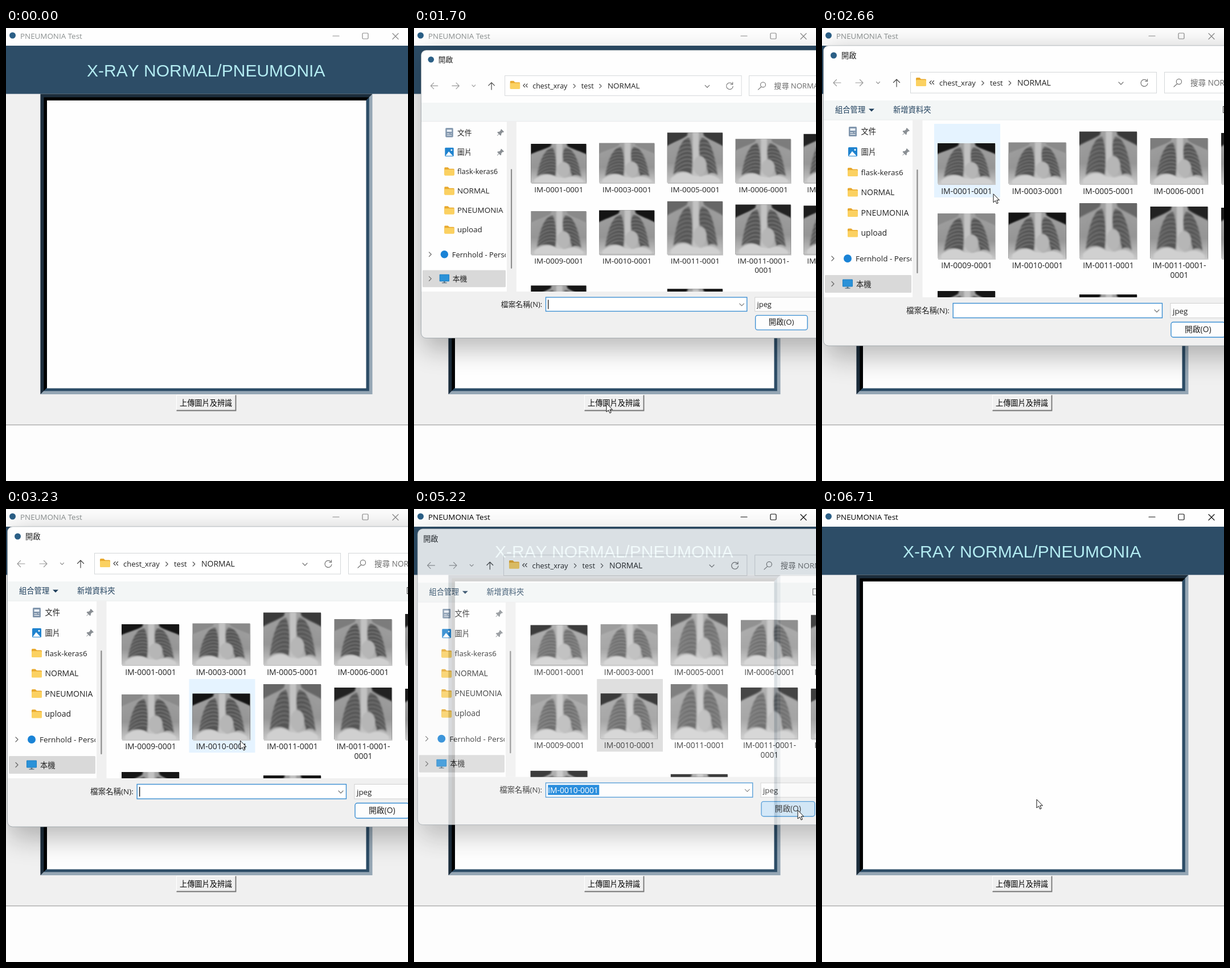
Animation of 706x794 px, one loop 8000 ms. Source, as an HTML page:

```html
<!DOCTYPE html>
<html lang="zh-Hant">
<head>
<meta charset="utf-8">
<title>PNEUMONIA Test</title>
<style>
html,body{margin:0;width:100%;height:100%;overflow:hidden;background:#fdfdfd}
svg{display:block}
text{font-family:'Open Sans','Noto Sans CJK TC','Noto Sans CJK',sans-serif;font-size:14px;fill:#222;white-space:pre}
.line{fill:none;stroke-linecap:round;stroke-linejoin:round}
</style>
</head>
<body>
<svg id="stage" width="706" height="794" viewBox="0 0 706 794"></svg>
<script>
const LOOP = 8000;
const NAV = '#2d4d67';

const rect = (x, y, w, h, fill, more = '') =>
  `<rect x="${x}" y="${y}" width="${w}" height="${h}" fill="${fill}" ${more}/>`;
const text = (x, y, s, more = '') => `<text x="${x}" y="${y}" ${more}>${s}</text>`;
const line = (d, color, w = 1.2, more = '') =>
  `<path class="line" d="${d}" stroke="${color}" stroke-width="${w}" ${more}/>`;
const shape = (d, fill) => `<path d="${d}" fill="${fill}"/>`;
const dot = (x, y, r, fill) => `<circle cx="${x}" cy="${y}" r="${r}" fill="${fill}"/>`;
const chevron = (x, y, color = '#777', r = 4) =>
  line(`M${x - r} ${y - r / 2}l${r} ${r}l${r} ${-r}`, color);
const next = (x, y, color = '#555', r = 3.5) =>
  line(`M${x - r / 2} ${y - r}l${r} ${r}l${-r} ${r}`, color);

// ---------- shared parts ----------
function ribs() {
  let d = '';
  for (let i = 0; i < 8; i++) {
    const y = 15 + i * 8;
    d += `M45 ${y}C37 ${y - 5} 24 ${y - 3} 12 ${y + 14}M57 ${y}C65 ${y - 5} 78 ${y - 3} 90 ${y + 14}`;
  }
  return line(d, '#989898', 2.2, 'opacity=".5"');
}

const defs = `<defs>
  <linearGradient id="skin" x1="0" y1="0" x2="0" y2="1">
    <stop offset="0" stop-color="#a2a2a2"/><stop offset=".6" stop-color="#959595"/><stop offset="1" stop-color="#cdcdcd"/>
  </linearGradient>
  <filter id="soft" x="0" y="0" width="1" height="1"><feGaussianBlur stdDeviation="1.5"/></filter>
  <filter id="shade" x="-20%" y="-20%" width="140%" height="140%"><feGaussianBlur stdDeviation="24"/></filter>
  <clipPath id="files"><rect x="177" y="161" width="640" height="311"/></clipPath>
  <clipPath id="side"><rect x="3" y="161" width="154" height="311"/></clipPath>
  <symbol id="chest" viewBox="0 0 100 100" preserveAspectRatio="none"><g filter="url(#soft)">
    ${shape('M-5 105V30C10 19 27 14 36 6L38 -5H64L66 6C74 14 90 19 105 30V105Z', 'url(#skin)')}
    ${shape('M40 10C28 9 17 32 11 83C22 75 34 76 44 83C47 60 46 28 40 10Z', '#545454')}
    ${shape('M62 10C75 9 85 32 91 85C85 80 79 79 74 83C73 67 63 57 59 45C56 30 57 18 62 10Z', '#545454')}
    ${ribs()}
    ${rect(46, -5, 11, 110, '#c2c2c2')}
    <ellipse cx="59" cy="66" rx="12" ry="19" fill="#b6b6b6"/>
    ${shape('M6 105V92C20 76 36 77 46 86L62 88C74 82 86 84 95 94V105Z', '#d0d0d0')}
  </g></symbol>
  <g id="folder">
    ${shape('M0 2a1.5 1.5 0 0 1 1.5 -1.5h5l2.5 2.5h7.5a1.5 1.5 0 0 1 1.5 1.5v9.500h-18z', '#e8a92e')}
    ${rect(0, 4.5, 18, 11, '#fbd161', 'rx="1.5"')}
  </g>
  <g id="pin">${shape('M1 -6l5 5l-1.500 1l-1 -.3l-2.500 2.500l-.3 3l-1.200 1l-2.700 -2.700l-3 3l-.6 -.6l3 -3l-2.700 -2.700l1 -1.200l3 -.3l2.500 -2.500l-.3 -1z', '#8a8f94')}</g>
</defs>`;

// ---------- main window ----------
function frame() {
  const l = 60.5, t = 115.5, r = 643.5, b = 642, w = 5.7;
  const corner = (i, c) => shape(
    `M${l + i} ${b - i}V${t + i}H${r - i}l${-w} ${w}H${l + i + w}V${b - i - w}z`, c);
  return rect(l, t, r - l, b - t, '#95a6b4') + corner(0, '#1c2d3c')
    + rect(l + w, t + w, r - l - 2 * w, b - t - 2 * w, NAV) + corner(w, '#000')
    + rect(72, 127, 560.5, 504.5, '#fefefe');
}

const windowArt = rect(0, 0, 706, 794, '#fdfdfd') + rect(0, 31, 706, 664, '#f0f0f0')
  + rect(0, 695, 706, 1.3, '#a6a6a6') + rect(0, 0, 706, 31, '#fefefe')
  + dot(11.5, 13, 5.5, '#2b5f86')
  + `<g id="caption">${text(25, 18.7, 'PNEUMONIA Test', 'style="font-size:13.4px;fill:inherit"')}
    ${['M574 14h11', 'M628 9h6.500q1.500 0 1.500 1.500v7q0 1.500 -1.500 1.500h-7q-1.500 0 -1.500 -1.500v-7q0 -1.500 1.500 -1.500', 'M679 9.500l10 10M689 9.500l-10 10']
      .map(d => `<path class="line" d="${d}" stroke-width="1.2"/>`).join('')}</g>`
  + rect(0, 31, 706, 84.5, NAV)
  + text(142, 84.5, 'X-RAY NORMAL/PNEUMONIA',
    `style="font:30px 'Liberation Sans',Arial,sans-serif;font-kerning:none;fill:#b3ecf2"`)
  + frame()
  + rect(299, 643, 105, 28, '#f0f0f0')
  + `<path id="edgeA" d="M299.500 670.500V643.500H403.500" fill="none"/>
     <path id="edgeB" d="M299.500 670.500H403.500V643.500" fill="none" stroke-width="1.8"/>`
  + text(305, 662, '上傳圖片及辨識', 'id="upload" style="font-size:13.2px;fill:#000"');

// ---------- file dialog ----------
const COL = 124.5, ROW = 130;
const tops = [[202, 200.5, 181.5, 193, 184], [325, 323.5, 307, 313, 315]];
const tones = [['#161616', '#8a8a8a', '#3a3a3a', '#7c7c7c', '#222'],
  ['#8a8a8a', '#141414', '#666', '#222', '#1c1c1c']];
const names = [['0001', '0003', '0005', '0006', '0007'], ['0009', '0010', '0011', '0011', '0013']];

function thumb(x, y, h, tone) {
  return rect(x + 1, y + 1, 101, h + 1, '#c9c9c9') + rect(x, y, 101, h, tone)
    + `<use href="#chest" x="${x}" y="${y}" width="101" height="${h}"/>`;
}

function fileList() {
  const mid = 'text-anchor="middle"';
  let s = '';
  tops.forEach((list, r) => list.forEach((y, c) => {
    const x = 203 + c * COL, mx = x + 51, split = r === 1 && c === 3;
    s += thumb(x, y, 273 + r * 131 - y, tones[r][c])
      + text(mx, 290.5 + r * ROW, `IM-${names[r][c]}-0001${split ? '-' : ''}`, mid)
      + (split ? text(mx, 437.5, '0001', mid) : '');
  }));
  return s + thumb(203, 461, 80, '#161616') + thumb(203 + 2 * COL, 467, 80, '#161616');
}

function sidebar() {
  const icon = y => `<use href="#folder" x="45" y="${y - 8}"/>`;
  const item = (y, s, size = 14) => icon(y) + text(68.5, y + 5, s, `style="font-size:${size}px"`);
  const pin = y => `<use href="#pin" x="148" y="${y}"/>`;
  return rect(5, 433, 152, 31, '#d9d9d9', 'rx="1.5"')
    + rect(47, 173, 14, 17, '#8196ad', 'rx="1.5"') + rect(49.5, 176, 9, 4, '#e8eef5')
    + line('M50 183.500h4M50 186.500h8M57 183h1', '#fff', 1)
    + text(68.5, 186, '文件', 'style="font-size:13.3px"') + pin(181)
    + rect(46, 209, 16, 16, '#1f83cf', 'rx="1.5"') + shape('M47 224l6 -8l7.500 8z', '#fff') + dot(58, 213.5, 1.5, '#fff')
    + text(68.5, 222, '圖片', 'style="font-size:13.3px"') + pin(217)
    + item(252.5, 'flask-keras6', 13.4) + item(288, 'NORMAL') + item(323.5, 'PNEUMONIA') + item(359, 'upload')
    + next(19, 404, '#666', 4) + dot(45, 404, 7, '#1a83d6') + text(59, 409, 'Fernhold - Personal', 'style="font-size:13.5px"')
    + next(19, 448.5, '#666', 4) + rect(36, 440.5, 18, 13, '#1c7fc4', 'rx="1"') + rect(37, 441.5, 16, 11, '#2b92d8')
    + rect(43.5, 453.5, 3, 2.5, '#5b7486') + rect(40.5, 455.5, 9, 1.3, '#5b7486')
    + text(60, 453.5, '本機', 'style="font-size:13.3px"');
}

const blue = 'style="font-size:13.3px;fill:#1f3f5c"';
const dialogArt = `<g id="dialog">
  ${rect(6, 40, 830, 537, '#000', 'rx="9" opacity=".27" filter="url(#shade)"')}
  ${rect(2.5, 31, 830, 526, '#f0f0f0', 'rx="9" stroke="#8b959c" stroke-width=".7"')}
  ${shape('M3 127V40a9 9 0 0 1 9 -8.500H800V127z', '#fefefe')}
  ${rect(3, 127, 800, 34, '#f3f6f6')}${rect(3, 160.5, 800, 311.5, '#fefefe')}
  ${rect(3, 160.5, 800, 1, '#e6e9ea')}
  <g id="mark">${dot(20.5, 48, 5.5, '#2b5f86')}</g>
  <text id="heading" y="53" style="font-size:13.3px">開啟</text>
  ${line('M33 96h-13m5.500 -5.500l-5.500 5.500l5.500 5.500M59 96h13m-5.500 -5.500l5.500 5.500l-5.500 5.500', '#999')}
  ${chevron(98.5, 96, '#999', 3)}${line('M131 103v-13m-5.500 5.500l5.500 -5.500l5.500 5.500', '#444')}
  ${rect(155.5, 77.5, 432, 36.5, '#fff', 'stroke="#d4d7d9"')}
  <use href="#folder" x="165" y="86.500"/>
  ${line('M192 92.500l-3 3l3 3M196.500 92.500l-3 3l3 3', '#444')}
  ${text(206, 101, 'chest_xray', 'style="font-size:13px"')}${next(282.5, 96.5)}
  ${text(295, 101, 'test', 'style="font-size:13px"')}${next(330, 96.5)}${text(343, 101, 'NORMAL')}
  ${chevron(525, 97)}
  ${line('M571 93a6 6 0 1 0 1 4M571.500 89.500v4h-4', '#777')}
  ${rect(601.5, 77.5, 240, 36.5, '#fff', 'stroke="#d4d7d9"')}
  ${line('M623.500 98l-5.500 5M631.500 94a4.600 4.600 0 1 1 -9.200 0a4.600 4.600 0 1 1 9.200 0', '#777')}
  ${text(647, 101, '搜尋 NORMAL', 'style="font-size:13.6px;fill:#6a6a6a"')}
  <g id="tools">${text(23, 148, '組合管理', blue)}${shape('M82 141.500h10l-5 5z', '#1f3f5c')}
    ${text(125, 148, '新增資料夾', blue)}${rect(704.5, 137.5, 12, 11, 'none', 'stroke="#444"')}</g>
  <g clip-path="url(#side)">${sidebar()}</g>
  ${rect(159, 161, 17.5, 311, '#f0f0f0')}${rect(166.3, 248, 2.2, 182, '#8b8b8b', 'rx="1"')}
  <g clip-path="url(#files)">
    <rect id="hover" width="116" height="129" fill="#e5f3ff"/>
    <rect id="pick" x="321.500" y="298.500" width="116" height="128"/>
    ${fileList()}
  </g>
  ${text(148, 500, '檔案名稱(N):', 'style="font-size:13.5px"')}
  <rect id="field" x="230.200" y="482.500" width="367.300" height="25.500" fill="#fff" stroke-width="1.4"/>
  <rect id="mask" x="234" y="486" width="91" height="18" fill="#0078d7"/>
  <text id="fileName" x="234" y="500.500">IM-0010-0001</text>
  <rect id="caret" x="234" y="487" width="1.300" height="17" fill="#111"/>
  ${chevron(588, 496)}
  ${rect(612, 482.5, 200, 25.5, '#fdfdfd', 'stroke="#d0d0d0"')}${text(616, 500.5, 'jpeg', 'style="font-size:13.4px"')}
  <rect id="open" x="613" y="515.500" width="95" height="26.500" rx="4" stroke="#3a8ed2" stroke-width="1.400"/>
  ${text(637, 533, '開啟(O)', 'style="font-size:13.8px"')}
</g>`;

const pointerArt = `<g id="pointer"><circle id="ring" r="13" fill="#fbec3f" opacity=".78"/>
  <path d="M0 0V15L3.500 11.800L5.900 17L8.200 16L5.900 10.900H10.500Z" fill="#fff" stroke="#111" stroke-linejoin="round"/></g>`;

const stage = document.getElementById('stage');
stage.innerHTML = defs + windowArt + dialogArt + pointerArt;

const el = {};
stage.querySelectorAll('[id]').forEach(n => el[n.id] = n);
const set = (id, props) => { for (const k in props) el[id].setAttribute(k, props[k]); };
const show = (id, on) => set(id, { visibility: on ? 'inherit' : 'hidden' });

// ---------- motion ----------
// start, end, steps, then waypoints [progress, x, y]
const moves = [
  [390, 740, 6, [[0.166, 553, 691], [0.5, 431, 634], [0.667, 380, 625], [1, 333, 669]]],
  [940, 1010, 2, [[0, 333, 669], [1, 338, 658]]],
  [1910, 2240, 6, [[0, 338, 658], [1, 330, 60]]],
  [2380, 3160, 12, [[0, 330, 60], [0.417, 301, 291], [0.667, 490, 270], [1, 415, 408]]],
  [3230, 3300, 2, [[0, 415, 408], [1, 408, 404]]],
  [3840, 4460, 10, [[0, 408, 404], [0.4, 462, 436], [0.8, 590, 523], [1, 615, 540]]],
  [4610, 4820, 4, [[0, 615, 540], [1, 674, 528]]],
  [5880, 6230, 6, [[0, 674, 528], [1, 333, 698]]],
  [6430, 6710, 5, [[0, 333, 698], [1, 377, 509]]]
];

function along(points, p) {
  if (p <= points[0][0]) return points[0].slice(1);
  const i = points.findIndex(q => q[0] >= p);
  const a = points[i - 1], b = points[i], u = (p - a[0]) / (b[0] - a[0]);
  return [a[1] + (b[1] - a[1]) * u, a[2] + (b[2] - a[2]) * u];
}

function pointerAt(t) {
  const m = moves.filter(v => t >= v[0]).pop();
  if (!m) return null;
  const [t0, t1, n, points] = m;
  const step = Math.floor((t - t0 + 10) / ((t1 - t0) / (n - 1))) + 1;
  return along(points, Math.min(1, step / n));
}

// time, opacity, scale x, shift x, scale y, shift y
const poses = [
  [1630, .4, .92, 21, .91, 20],
  [1700, 1, .9617, 10.1, .959, 9.3],
  [1770, 1, .984, 4.2, .983, 3.9],
  [1840, 1, .995, 1.3, .995, 1.2],
  [1910, 1, 1, 0, 1, 0],
  [5220, .83, .989, 3.8, .986, 4.3],
  [5290, .35, .965, 10, .96, 10],
  [5350, 0, 1, 0, 1, 0]
];

function draw(t) {
  const within = (a, b) => t >= a && t < b;
  const active = within(1280, 1630) || t >= 5220;
  set('caption', { fill: active ? '#000' : '#8b9090', stroke: 'none' });
  el.caption.querySelectorAll('path').forEach(p => p.setAttribute('stroke', active ? '#111' : '#8b8b8b'));

  const down = within(1280, 1490);
  set('edgeA', { stroke: down ? '#6e6e6e' : '#fff', 'stroke-width': down ? 1.8 : 1 });
  set('edgeB', { stroke: down ? '#fff' : '#757575' });
  set('upload', { transform: down ? 'translate(1 1)' : '' });

  const pose = poses.filter(p => t >= p[0]).pop();
  const visible = within(1630, 5350);
  set('dialog', { visibility: visible ? 'visible' : 'hidden' });
  const at = pointerAt(t);
  if (visible) {
    const [, op, sx, tx, sy, ty] = pose;
    set('dialog', { opacity: op, transform: `matrix(${sx} 0 0 ${sy} ${tx} ${ty})` });
    const [x, y] = at;
    const c = Math.floor((x - 197) / COL), r = Math.floor((y - 168) / ROW);
    const hx = 197 + c * COL, hy = 168 + r * ROW;
    show('hover', t >= 1910 && c >= 0 && r >= 0 && r < 2 && x < hx + 116 && y < hy + 129);
    set('hover', { x: hx, y: hy });
    const pressed = t >= 5020;
    show('pick', t >= 3640);
    set('pick', { fill: pressed ? '#d9d9d9' : '#cce8ff', stroke: pressed ? '#d9d9d9' : '#99d1ff' });
    show('mark', t < 5220);
    set('heading', { x: t < 5220 ? 34 : 12.5 });
    show('tools', t >= 1910);
    set('field', { stroke: within(3840, 5020) ? '#8f8f8f' : '#3a8ed2' });
    show('caret', within(1630, 2580) || within(3110, 3640));
    show('fileName', t >= 3640);
    show('mask', pressed);
    el.fileName.style.fill = pressed ? '#fff' : '#222';
    const over = x > 613 && y > 515 && y < 542;
    set('open', { fill: pressed ? '#cce4f7' : over ? '#e5f1fb' : '#fdfdfd' });
  }

  set('pointer', { visibility: at ? 'visible' : 'hidden' });
  if (at) set('pointer', { transform: `translate(${at[0].toFixed(1)} ${at[1].toFixed(1)})` });
  show('ring', within(1280, 1410) || within(3640, 3840) || within(5020, 5220));
}

const began = performance.now();
function tick() {
  draw((performance.now() - began) % LOOP);
  requestAnimationFrame(tick);
}
tick();
</script>
</body>
</html>
```
